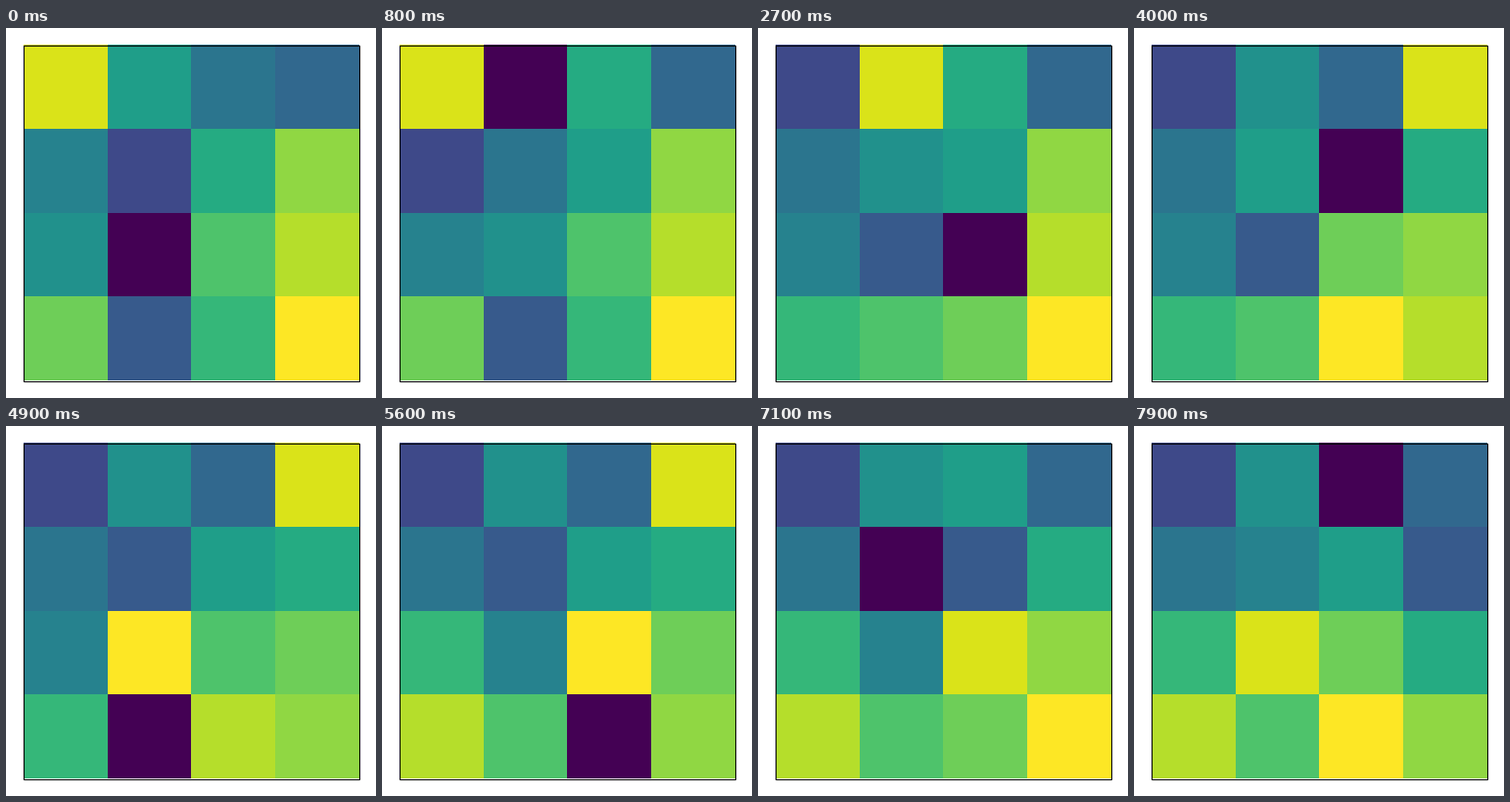
A matplotlib script that plays this animation: 400 px wide and 400 px high, repeating every 8000 ms.

```python
import numpy as np
import matplotlib.pyplot as plt
from matplotlib.animation import FuncAnimation
from matplotlib.patches import Rectangle

SIZE = 400
BLANK = -3
START = [[14, 7, 4, 3],
         [5, 1, 8, 12],
         [6, BLANK, 10, 13],
         [11, 2, 9, 15]]

# Path of the blank square: up, down, left, right
MOVES = ("LURURDLULDRDRDLL" "URRDLULDRUR" "DRUUULLDRRULD"
         "LDDRRULLD" "RULLDRRURDLURU" "ULDRDLULDRDRUULU")
STEP = {"U": (-1, 0), "D": (1, 0), "L": (0, -1), "R": (0, 1)}


def play(start, moves):
    """Return the board before the first move and after each move."""
    board = np.array(start)
    boards = [board.copy()]
    r, c = np.argwhere(board == BLANK)[0]
    for move in moves:
        dr, dc = STEP[move]
        board[r, c] = board[r + dr, c + dc]
        r, c = r + dr, c + dc
        board[r, c] = BLANK
        boards.append(board.copy())
    return boards


boards = play(START, MOVES)

fig = plt.figure(figsize=(4, 4), dpi=100, facecolor="white")
ax = fig.add_axes([0, 0, 1, 1])
ax.set_axis_off()

# Cell edges in whole pixels keep the tiles crisp
x_edges = [19, 110, 200, 291, 382]
y_edges = [18, 109, 200, 290, 381]
mesh = ax.pcolormesh(x_edges, y_edges, boards[0], cmap="viridis",
                     vmin=BLANK, vmax=15, antialiased=False)
ax.add_patch(Rectangle((19, 19), 363, 363, fill=False, edgecolor="black",
                       linewidth=0.8, snap=True, zorder=3))
ax.set_xlim(0, SIZE)
ax.set_ylim(SIZE, 0)


def update(i):
    mesh.set_array(boards[i])
    return [mesh]


anim = FuncAnimation(fig, update, frames=len(boards), interval=100,
                     repeat=True, repeat_delay=0, blit=False)
plt.show()
```
